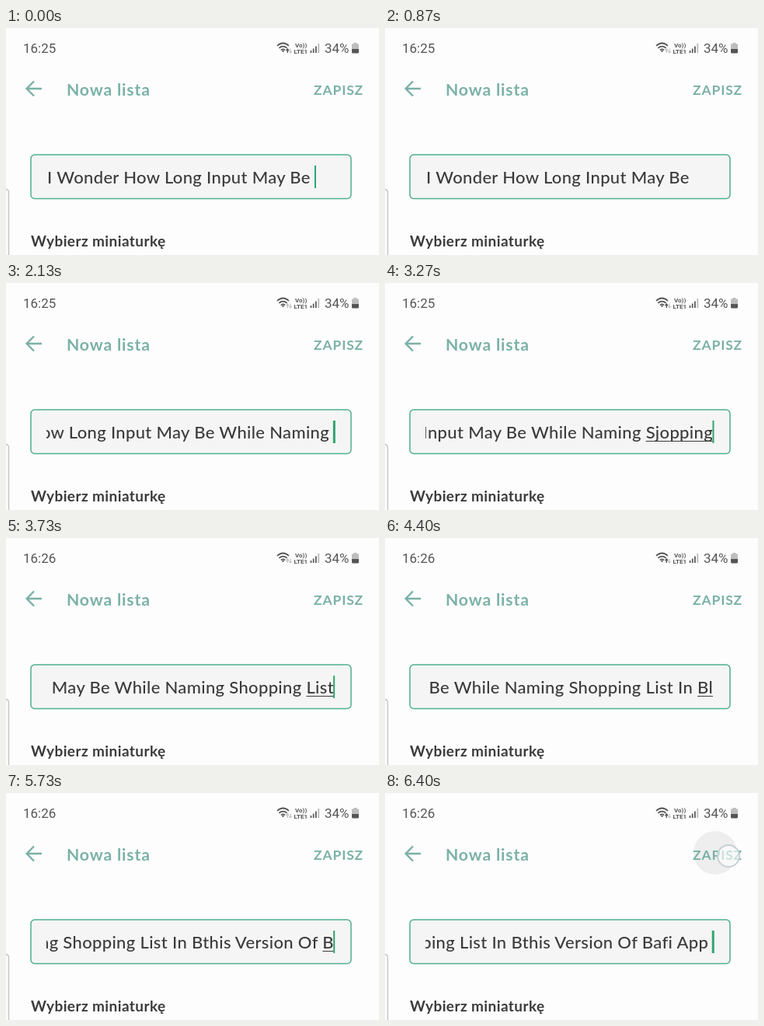
Recreate the animation shown at these times as an HTML page. Size 480x292 px, loop 6470 ms.

```html
<!DOCTYPE html>
<html lang="pl">
<head>
<meta charset="utf-8">
<title>Nowa lista</title>
<style>
  html, body { margin: 0; width: 100%; height: 100%; overflow: hidden; background: #fdfdfd; }
  #stage { position: relative; width: 480px; height: 292px; overflow: hidden; }
  svg { position: absolute; left: 0; top: 0; }
  text { font-family: Lato, sans-serif; font-weight: 700; }
  .status { font: 400 17px Roboto, sans-serif; fill: #555; }
  .tiny { font: 700 8px Roboto, sans-serif; fill: #555; }
  .accent { fill: #7bb1a7; letter-spacing: .85px; }
  #field { position: absolute; left: 52px; top: 174px; width: 373px; height: 34px; overflow: hidden; }
  #line {
    position: absolute; left: 1px; top: 2.5px; white-space: pre;
    font: 500 22px/30px Lato, sans-serif; letter-spacing: .34px; color: #3b3b3d;
    transform: translateX(min(0px, 369px - 100%));
  }
  #word { text-decoration: underline 1.3px; text-underline-offset: 3px; text-decoration-skip-ink: none; }
  #caret { position: absolute; left: 100%; top: .5px; margin-left: -1px; width: 2.6px; height: 29px; background: #2fa56e; }
</style>
</head>
<body>
<div id="stage">
  <svg width="480" height="292" fill="none">
    <text id="clock" class="status" x="22" y="31.5"></text>
    <g stroke="#555" stroke-width="1.7">
      <path d="M349 23Q356.5 16 364 23M351.4 25.8Q356.5 21.3 361.6 25.8M353.9 28.3Q356.5 26.3 359.1 28.3"/>
      <path d="M354.7 29.1H358.3L356.5 31.3Z" fill="#555" stroke="none"/>
    </g>
    <path id="upload" stroke-width="1.4" d="M362.3 32V27M360.5 29L362.3 27L364.1 29"/>
    <path stroke="#c4c4c4" stroke-width="1.2" d="M366 26.5V31.7M364.3 30L366 31.8L367.7 30"/>
    <text class="tiny" x="372" y="24.5">Vo))</text>
    <text class="tiny" x="370.5" y="33">LTE1</text>
    <path stroke="#555" stroke-width="1.7" d="M392.5 32V29M395.7 32V26.5M398.9 32V23.5"/>
    <path stroke="#b5b5b5" stroke-width="1.7" d="M402.3 32V20"/>
    <text class="status" x="410" y="31.5">34%</text>
    <path fill="#bdbdbd" d="M447.5 19H451.5V20.5H454V27H445V20.5H447.5Z"/>
    <path fill="#555" d="M445 27H454V31Q454 32.5 452.5 32.5H446.5Q445 32.5 445 31Z"/>

    <circle id="ripple" cx="425" cy="77" fill="#eee"/>
    <path stroke="#7bb1a7" stroke-width="2.5" d="M46 78H27M36 68.5L26.7 78L36 87.5"/>
    <text class="accent" x="78" y="86.7" font-size="21.2">Nowa lista</text>
    <text class="accent" x="396" y="85.5" font-size="17.5">ZAPISZ</text>
    <circle id="touch" cx="442" cy="81" r="14" fill="#fff" fill-opacity=".6" stroke="#c3d0d6" stroke-width="2"/>

    <rect x="32" y="163" width="412" height="56.5" rx="5" fill="#f5f5f5" stroke="#4fb08f" stroke-width="1.5"/>
    <path stroke="#c6c6c6" stroke-width="1.5" d="M0 207.5Q3.5 208 3.5 212V292"/>
    <text x="32" y="281" font-size="19" fill="#3b3b3d" letter-spacing=".4">Wybierz miniaturkę</text>
  </svg>
  <div id="field"><div id="line"><span id="done"></span><span id="word"></span><i id="caret"></i></div></div>
</div>
<script>
const LOOP = 6470, BLINK = 260, PRESS = 6270;
const $ = id => document.getElementById(id);

// [first key time, last key time, keys]; "<" is backspace
const typing = [
  [0, 0, 'I Wonder How Long Input May Be '],
  [1590, 1660, 'Wh'],
  [1730, 2120, 'ile Naming '],
  [2530, 3250, 'Sjopping'],
  [3330, 3330, '<<<<<<<hopping '],
  [3460, 4070, 'List In Bl'],
  [4600, 4600, '<'],
  [4670, 5690, 'this Version Of B'],
  [5800, 6200, 'afi App ']
];
const uploads = [[0, 400], [1400, 1600], [2530, 3600], [4200, 4900], [6130, LOOP]];

function typed(t) {
  let text = '', last = 0;
  for (const [start, end, keys] of typing) {
    if (t < start) break;
    const gap = (end - start) / Math.max(1, keys.length - 1);
    const count = t >= end ? keys.length : 1 + Math.floor((t - start) / gap);
    for (const key of keys.slice(0, count)) text = key === '<' ? text.slice(0, -1) : text + key;
    last = t >= end ? end : start + (count - 1) * gap;
  }
  return { text, last };
}

function draw(t) {
  const { text, last } = typed(t);
  const split = text.lastIndexOf(' ') + 1;
  $('done').textContent = text.slice(0, split);
  $('word').textContent = text.slice(split);
  $('caret').style.opacity = Math.floor((t - last) / BLINK) % 2 ? 0 : 1;

  $('clock').textContent = t < 3600 ? '16:25' : '16:26';
  const busy = uploads.some(([a, b]) => t >= a && t < b);
  $('upload').setAttribute('stroke', busy ? '#555' : '#c4c4c4');

  $('ripple').setAttribute('r', Math.max(0, Math.min(28, (t - PRESS) * .25)));
  $('touch').style.opacity = t >= PRESS ? 1 : 0;
}

const began = performance.now();
function tick() {
  draw((performance.now() - began) % LOOP);
  requestAnimationFrame(tick);
}
tick();
</script>
</body>
</html>
```
